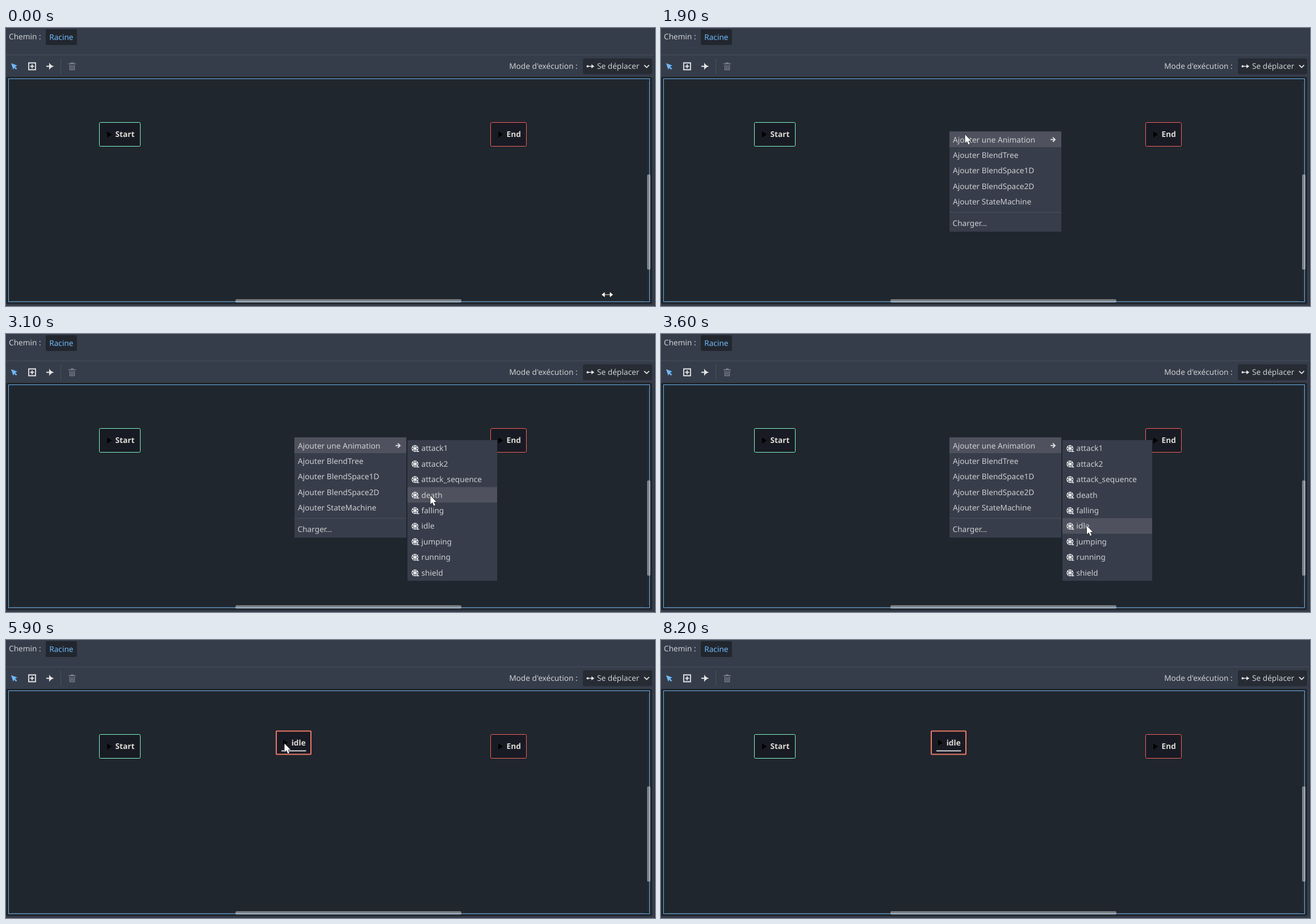
These frames come from a looping animation (1143 by 490 pixels, 8900 ms). An HTML page:

```html
<!DOCTYPE html>
<html lang="fr">
<head>
<meta charset="utf-8">
<title>Machine à états</title>
<style>
  html, body { margin: 0; width: 100%; height: 100%; overflow: hidden; background: #363d4a; }
  svg { display: block; width: 1143px; height: 490px; }
  text { font: 13.67px "Noto Sans", sans-serif; fill: #cdcfd2; text-rendering: geometricPrecision; }
  .node text { font-weight: 700; fill: #dedcd6; }
  .node path { fill: #e6e6e6; }
  .node rect { fill: #191b24; }
  .hover path { fill: #5fa8e8; }
  .panel { fill: #373d4a; }
  .lit { fill: #4f525e; }
  .icon { fill: none; stroke: #e4e5e7; stroke-width: 1.8; }
  .solid { fill: #e4e5e7; }
  .thumb { fill: #fff; opacity: .4; }
</style>
</head>
<body>
<svg viewBox="0 0 1143 490">
  <defs>
    <path id="play" d="M0 -5.4L8.2 0L0 5.4Z"/>
    <g id="reel">
      <circle r="6" class="solid"/>
      <path d="M3 5.2H7" class="icon"/>
      <circle r="3.8" fill="none" stroke="#373d4a" stroke-width="2.4" stroke-linecap="round" pathLength="6" stroke-dasharray="0 1"/>
    </g>
  </defs>

  <rect width="1143" height="490" fill="#363d4a"/>
  <path d="M0 47.5H1143" stroke="#474d59"/>
  <path d="M1142.5 0V490" stroke="#2a2f39"/>

  <text x="5" y="19.7">Chemin :</text>
  <rect x="70" y="2" width="55" height="28" rx="3" fill="#22272f"/>
  <text x="76.2" y="20.5" style="fill:#70bafa">Racine</text>

  <path d="M9 62L20 66.3L16 68L19.4 71.5L17.7 73.2L14.3 70L12.8 73.6Z" fill="#70bafa"/>
  <path d="M40 61.5H52V73.5H40ZM46 64V71M42.5 67.5H49.5" class="icon"/>
  <path d="M71 66.4H76V61Q78.5 65.8 84.5 67.5Q78.5 69.2 76 74V68.6H71Z" class="solid"/>
  <path d="M96.5 54V81" stroke="#4b515d"/>
  <path d="M110 63H123M114 61.5H119M112.5 65V73.5H120.5V65M115.2 65.5V72M117.8 65.5V72" fill="none" stroke="#7c818a" stroke-width="1.4"/>

  <text x="886.2" y="71.7">Mode d'exécution :</text>
  <rect x="1016" y="53.5" width="122" height="28" rx="3" fill="#262b34"/>
  <circle cx="1024.3" cy="67.5" r="1.9" class="solid"/>
  <path d="M1024 67.5H1032" class="icon" style="stroke-width:1.4"/>
  <path d="M1031 64L1036.2 67.5L1031 71Z" class="solid"/>
  <text x="1041" y="72.4">Se déplacer</text>
  <path d="M1124 65.3L1128.3 69.6L1132.6 65.3" class="icon"/>

  <rect y="86" width="1138" height="400.5" rx="3" fill="#20262d"/>
  <path d="M1131.5 94V478M9 481H1124" stroke="#2b3139" stroke-width="2"/>
  <rect x="4.5" y="89.5" width="1129" height="393" fill="none" stroke="#6cb2ef"/>
  <rect x="1129" y="258" width="6" height="168" rx="2.5" class="thumb"/>
  <rect x="404" y="478" width="398" height="6" rx="2.5" class="thumb"/>

  <g class="node" transform="translate(164 166)">
    <rect x=".5" y=".5" width="72" height="42" rx="2" stroke="#80f6cf"/>
    <use href="#play" x="14" y="21.7"/>
    <text x="28.6" y="26.3">Start</text>
  </g>
  <g class="node" transform="translate(853 166)">
    <rect x=".5" y=".5" width="63" height="42" rx="2" stroke="#f2605c"/>
    <use href="#play" x="14" y="21.7"/>
    <text x="28.6" y="26.3">End</text>
  </g>
  <g class="node" id="idle" transform="translate(474.5 159.5)">
    <rect x=".5" width="63" height="43" rx="2"/>
    <use href="#play" x="13.5" y="21.4"/>
    <text x="28.2" y="26">idle</text>
    <g id="selected">
      <rect x="1.5" y="1" width="61" height="41" rx="1" style="fill:none" stroke="#ee7a6a" stroke-width="2"/>
      <rect x="10.5" y="35" width="43.5" height="1.8" style="fill:#e4e5e7"/>
    </g>
  </g>

  <g id="menu">
    <rect x="508" y="182" width="197" height="177" class="panel"/>
    <rect x="508" y="182.5" width="197" height="27.5" class="lit" id="menuLit"/>
    <path d="M508 325H705" stroke="#4d525f"/>
    <path d="M686 196.7H693.5M690 192.7L694 196.7L690 200.7" class="icon"/>
  </g>
  <g id="sub">
    <rect x="707" y="187" width="158" height="248" class="panel"/>
    <rect x="707" width="158" height="27.4" class="lit" id="subLit"/>
  </g>

  <path id="resize" d="M1049 470L1054.5 465.5V469.4H1063.5V465.5L1069 470L1063.5 474.5V470.6H1054.5V474.5Z" fill="#fff" stroke="#111" paint-order="stroke"/>
  <path id="arrow" d="M0 0V15L3.5 11.8L6 17.7L8.4 16.6L6 11H10.5Z" fill="#fff" stroke="#15171c" stroke-width="1.2" paint-order="stroke"/>
</svg>
<script>
const LOOP = 8900, STEP = 100, ROW = 27.4, SUB_TOP = 187.6;
const $ = id => document.getElementById(id);

// Straight pointer strokes, each starting where the previous one ended.
const home = { x: 1059, y: 470 };
const strokes = [
  { from: 100, to: 200, x: 616, y: 308 },
  { from: 400, to: 500, x: 535, y: 221 },
  { from: 900, to: 1000, x: 507, y: 182 },
  { from: 1900, to: 2000, x: 564, y: 193.5 },
  { from: 2600, to: 2900, x: 718, y: 205 },
  { from: 3000, to: 3100, x: 747.5, y: 285 },
  { from: 3200, to: 3600, x: 750, y: 338 },
  { from: 5100, to: 5500, x: 490.5, y: 182.5 },
  { from: 7700, to: 8200, x: -31, y: 500 }
];

function pointerAt(t) {
  let { x, y } = home;
  for (const s of strokes) {
    if (t < s.from) break;
    const done = Math.floor((t - s.from) / STEP) + 1;
    const p = Math.min(1, done / ((s.to - s.from) / STEP + 1));
    x += (s.x - x) * p;
    y += (s.y - y) * p;
  }
  return { x, y };
}

function add(parent, tag, attributes, label = "") {
  const el = document.createElementNS("http://www.w3.org/2000/svg", tag);
  for (const name in attributes) el.setAttribute(name, attributes[name]);
  el.textContent = label;
  parent.append(el);
}

["une Animation", "BlendTree", "BlendSpace1D", "BlendSpace2D", "StateMachine"]
  .forEach((name, i) => add($("menu"), "text", { x: 514, y: 201.5 + i * ROW }, "Ajouter " + name));
add($("menu"), "text", { x: 513.5, y: 349.2 }, "Charger...");

["attack1", "attack2", "attack_sequence", "death", "falling", "idle", "jumping", "running", "shield"]
  .forEach((name, i) => {
    add($("sub"), "use", { href: "#reel", x: 720.3, y: 201.7 + i * ROW });
    add($("sub"), "text", { x: 731.5, y: 206.3 + i * ROW }, name);
  });

const show = (id, on) => $(id).style.display = on ? "" : "none";

function draw(t) {
  const within = (from, to) => t >= from && t < to;
  const { x, y } = pointerAt(t);

  show("resize", t < 100);
  show("arrow", t >= 100);
  $("arrow").setAttribute("transform", `translate(${x} ${y})`);

  show("menu", within(1400, 4100));
  show("menuLit", t >= 1900);
  show("sub", within(2300, 4100));
  show("subLit", x > 707);
  $("subLit").setAttribute("y", SUB_TOP + Math.floor((y - SUB_TOP) / ROW) * ROW);

  show("idle", t >= 4100);
  show("selected", t >= 5900);
  $("idle").querySelector("use").style.fill = "";
  $("idle").classList.toggle("hover", within(5500, 7700));
}

const start = performance.now();
function tick() {
  draw((performance.now() - start) % LOOP);
  requestAnimationFrame(tick);
}
tick();
</script>
</body>
</html>
```
